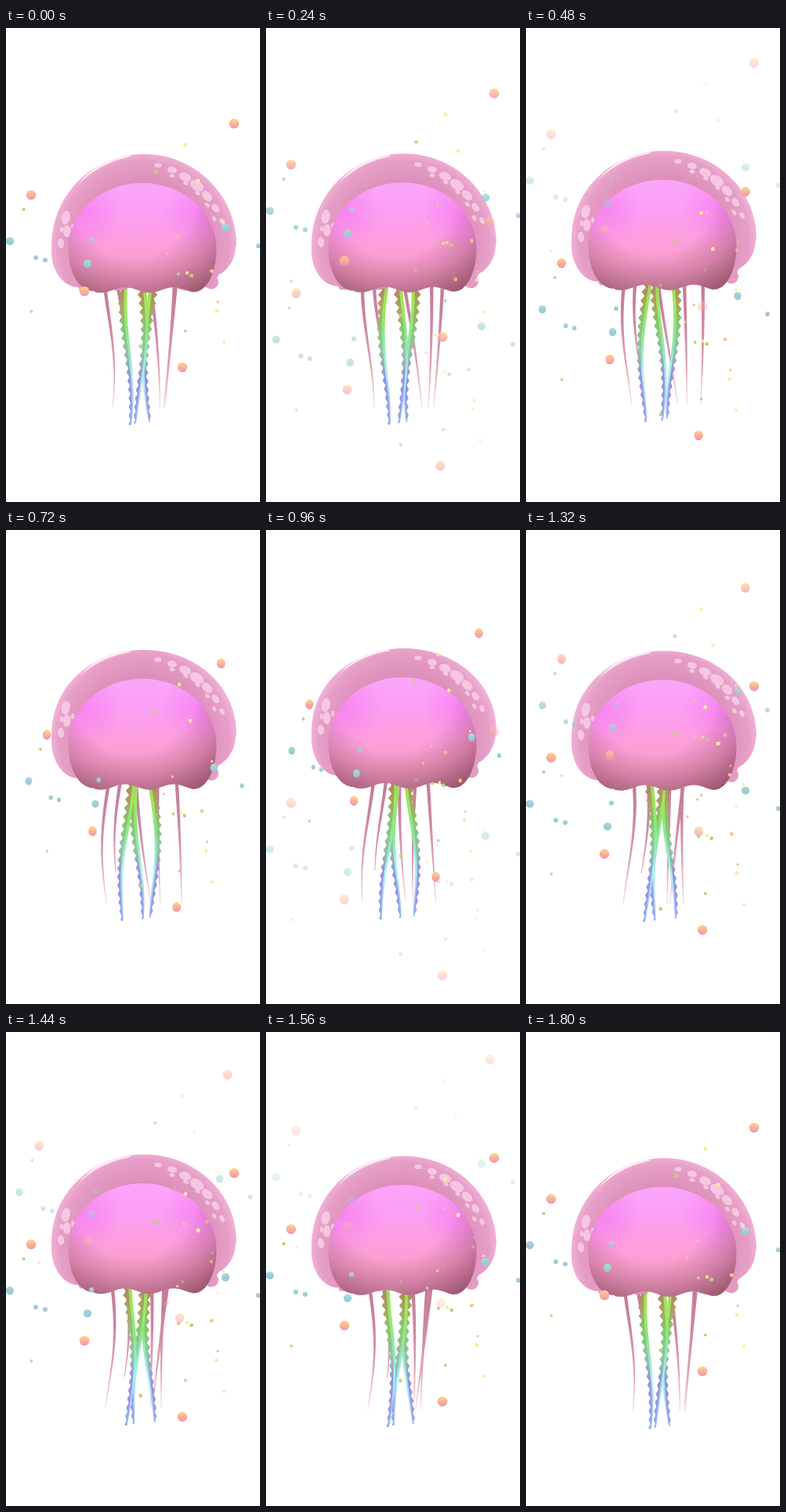
An HTML page with a canvas for the animation above (1.83 s loop, 324 px wide and 605 px high).

```html
<!DOCTYPE html>
<html lang="en">
<head>
<meta charset="utf-8">
<title>Jellyfish</title>
<style>
html, body { margin: 0; width: 100%; height: 100%; overflow: hidden; background: #fff; }
canvas { display: block; }
</style>
</head>
<body>
<canvas id="stage" width="324" height="605"></canvas>
<script>
const ctx = document.getElementById('stage').getContext('2d');
const CYCLE = 1800, STEP = 30;  // the first pose is held one step longer at the end
const LOOP = CYCLE + STEP;
const TAU = Math.PI * 2, DEG = Math.PI / 180;
const RISE = 290 / CYCLE;       // bubble speed, px per ms
const SWARM_LAG = 1020;
const CENTER = 173.5;           // axis of the bubble squeeze
const BELL = { x: 176, y: 278, rx: 118, ry: 117 };

const mix = (a, b, s) => a + (b - a) * s;
const clamp = v => Math.max(0, Math.min(1, v));
const wave = turns => Math.cos(TAU * turns);

function seeded(seed) {
  return () => (seed = (seed * 16807) % 2147483647) / 2147483647;
}

function stops(g, list) {
  list.forEach((color, i) => g.addColorStop(i / (list.length - 1), color));
  return g;
}
const vertical = (y0, y1, ...list) => stops(ctx.createLinearGradient(0, y0, 0, y1), list);
const radial = (x, y, r0, r1, ...list) => stops(ctx.createRadialGradient(x, y, r0, x, y, r1), list);

function fillShape(pts, style) {
  ctx.beginPath();
  pts.forEach(([x, y]) => ctx.lineTo(x, y));
  ctx.fillStyle = style;
  ctx.fill();
}

// Points along part of an ellipse, angles in degrees
function arc(x, y, rx, ry, from, to) {
  const n = 40;
  return Array.from({ length: n + 1 }, (_, i) => {
    const a = mix(from, to, i / n) * DEG;
    return [x + rx * Math.cos(a), y + ry * Math.sin(a)];
  });
}

function hem(from, to, height) {
  const pts = [];
  for (let x = from; x >= to; x -= 2) pts.push([x, height(x)]);
  return pts;
}

const shell = [
  ...arc(BELL.x, BELL.y, BELL.rx, BELL.ry, 180, 360),
  ...arc(256, 278, 37, 41, 0, 65),
  ...arc(262, 325, 9, 8.5, -40, 110),
  ...hem(254, 94, x => 333 + 2.5 * Math.sin(x / 7)),
  ...arc(92, 286, 34, 45, 90, 180)
];
const dome = [
  ...arc(174, 282, 94.5, 84, 180, 360),
  ...arc(240, 282, 28.5, 55, 0, 90),
  ...hem(238, 114, x => 334.5 + 3.5 * wave((x - 183) / 62)),
  ...arc(112, 286, 32, 50, 90, 180)
];

// Rise of each height of the shell and the dome in pose k (0 relaxed, 1 contracted)
const shellUp = (y, k) => y - k * (10 + 10 * Math.sin(Math.PI * (y - 161) / 230));
const domeUp = (y, k) => y - k * mix(10, 8, (y - 198) / 140);

function spot(angle, radius, long, wide, k) {
  const a = angle * DEG;
  const x = BELL.x + radius * Math.cos(a), y = BELL.y + radius * Math.sin(a);
  ctx.beginPath();
  ctx.ellipse(x, shellUp(y, k), long, wide, a + Math.PI / 2 - .15, 0, TAU);
  ctx.fill();
}

function drawSpots(k) {
  ctx.fillStyle = 'rgba(250, 209, 233, .8)';
  for (let i = -3; i <= 3; i++) {
    const size = 9.6 - 1.7 * Math.abs(i);
    spot(-48.6 + 10.5 * i, 102 + i * i / 4, size, size * .66, k);
  }
  for (let i = 0; i < 5; i++) spot(-68 + 11.8 * i, 96, 3.5, 2.4, k);
  for (let i = 0; i < 3; i++) {
    spot(199.6 - 9 * i, 103 + 3 * wave(i / 2), 9 - 1.2 * i, 5.5 - .7 * i, k);
  }
  for (let i = 0; i < 2; i++) spot(195 - 4 * i, 94 + 13 * i, 3.6, 2.2, k);
}

function drawGloss(k) {
  const up = y => shellUp(y, k);
  ctx.beginPath();
  ctx.moveTo(92, up(200));
  ctx.quadraticCurveTo(116, up(168), 159, up(162.5));
  ctx.quadraticCurveTo(159, up(165), 152, up(166));
  ctx.quadraticCurveTo(118, up(174), 92, up(200));
  ctx.fillStyle = '#fdeaf7';
  ctx.fill();
}

function drawShell(k) {
  fillShape(shell.map(([x, y]) => [x, shellUp(y, k)]),
    radial(BELL.x, BELL.y - 14 * k, 80, 122, '#dc90b9', '#e197c0', '#e69ec7', '#f4b8db'));
  drawGloss(k);
  drawSpots(k);
}

function drawDome(k) {
  const pts = dome.map(([x, y]) => [x, domeUp(y, k)]);
  const up = -10 * k;
  fillShape(pts, vertical(198 + up, 340 + up, '#fba5fb', '#fb9ff4', '#fd9fdf', '#fa9fcd', '#e497b7'));
  for (const x of [96, 250]) {
    fillShape(pts, radial(x, 236 + up, 0, 52, 'rgba(245,105,240,.5)', 'rgba(245,105,240,0)'));
  }
  fillShape(pts, radial(163, 212 + up, 80, 150,
    'rgba(150,80,105,0)', 'rgba(150,80,105,.38)', 'rgba(140,72,95,.82)'));
}

// Tentacles sway as a wave that travels from root to tip
function swayX(t, s, phase) {
  const reach = t.sway * (1 + t.bulge * Math.sin(Math.PI * s));
  return mix(t.root, t.tip, s) + reach * wave(phase - t.phase - t.delay * s);
}

const strands = [
  { root: 131, tip: 130, phase: .62 },
  { root: 147, tip: 148, phase: .65 },
  { root: 176, tip: 188, phase: .87 },
  { root: 203, tip: 195, phase: 1 },
  { root: 213, tip: 211, phase: 1.2 }
].map((t, i) => ({
  ...t, sway: 8 + 1.4 * i, delay: .15 + .35 * (1 - i / 4) ** 2, bulge: 0, end: i === 1 ? 445 : 485
}));

const ribbons = [2, 1, 0].map(i => ({
  root: 157 + 13.5 * i, tip: 153 + 16 * i, phase: .5 + .33 * i,
  sway: 6, delay: .53, bulge: .4, end: 507 - 2 * i, side: i === 2 ? 1 : -1
}));

// Strip around a tentacle; the two functions give its reach to either side
function strip(t, phase, left, right, style) {
  const a = [], b = [], top = 322;
  for (let y = top; y <= t.end; y++) {
    const s = (y - top) / (t.end - top), x = swayX(t, s, phase);
    a.push([x - left(s, y), y]);
    b.unshift([x + right(s, y), y]);
  }
  fillShape(a.concat(b), style);
}

function drawTentacles(phase) {
  const pink = vertical(325, 486, '#c27a97', '#cb86a2', '#dfa3b9', '#f8dbe5');
  const width = s => mix(2.4, .5, s);
  strands.forEach(t => strip(t, phase, width, width, pink));

  const edge = vertical(325, 508, '#ad7d5c', '#a8a55c', '#86c873', '#94bfa8', '#9c8edd', '#9496e4', '#8cb2ee');
  const core = vertical(325, 508, '#a8cc5c', '#9dea5c', '#8fe684', '#94eac0', '#a2f5f1', '#a9c8f6', '#98b6f0');
  const teeth = y => Math.abs(y / 11 % 1 * 2 - 1);
  const body = s => .4 + 2.6 * Math.sqrt(1 - s);
  const frill = (s, y) => body(s) + 5 * teeth(y) * (1 - .6 * s);
  const thin = s => .4 + 1.2 * (1 - s);
  const glow = s => .4 + 4 * Math.sqrt(1 - s);
  const none = () => 0;
  ribbons.forEach(t => {
    const sides = (a, b) => t.side < 0 ? [a, b] : [b, a];
    strip(t, phase, ...sides(frill, thin), edge);
    strip(t, phase, ...sides(none, glow), core);
  });
}

const ORANGE = ['#fdd596', '#f9b394', '#f094ba'];
const TEAL = ['#b4dcd2', '#9bcfd4', '#99c6dd'];
const DUST = [['#fdf0a0', '#f8e38a'], ['#cbd98a', '#b4c674'], ['#fbd494', '#f2b888']];

const bubbles = [];
const add = (tints, r, ...places) => places.forEach(([x, y]) => bubbles.push({ x, y, r, tints }));
add(ORANGE, 6.3, [291, 122], [32, 213], [100, 336], [225, 433]);
add(TEAL, 5.2, [5, 272], [104, 301], [280, 255]);
add(TEAL, 3.1, [38, 293], [50, 296], [109, 271], [322, 278]);
const rnd = seeded(4127);
for (let i = 0; i < 17; i++) {
  add(DUST[i % 3], 1.6 + rnd(), [324 * rnd(), mix(146, 410, rnd())]);
}

function drawSwarm(age, squeeze) {
  const alpha = Math.min(clamp((age + 1020) / 420), clamp((700 - age) / 550));
  if (!alpha) return;
  ctx.save();
  ctx.globalAlpha = alpha;
  ctx.translate(CENTER, -RISE * age);
  ctx.scale(squeeze, 1);
  ctx.translate(-CENTER, 0);
  for (const { x, y, r, tints } of bubbles) {
    ctx.beginPath();
    ctx.arc(x, y, r, 0, TAU);
    ctx.fillStyle = vertical(y - r, y + r, ...tints);
    ctx.fill();
  }
  ctx.restore();
}

function draw(t) {
  const phase = t / CYCLE;
  const k = (1 - wave((t - 75) / CYCLE)) / 2;
  ctx.clearRect(0, 0, 324, 605);

  ctx.save();
  ctx.translate(0, -10 * k);
  drawTentacles(phase);
  ctx.restore();
  drawShell(k);
  drawDome(k);

  // Two swarms; the second is squeezed towards the axis and back
  const squeeze = 1 - .177 * (1 - Math.abs(2 * phase - 1));
  for (const lap of [0, CYCLE]) {
    drawSwarm(t - lap, 1);
    drawSwarm(t - SWARM_LAG + CYCLE - lap, squeeze);
  }
}

const start = performance.now();
function tick() {
  const t = (performance.now() - start) % LOOP;
  draw(Math.floor(t / STEP) * STEP % CYCLE);
  requestAnimationFrame(tick);
}
tick();
</script>
</body>
</html>
```
